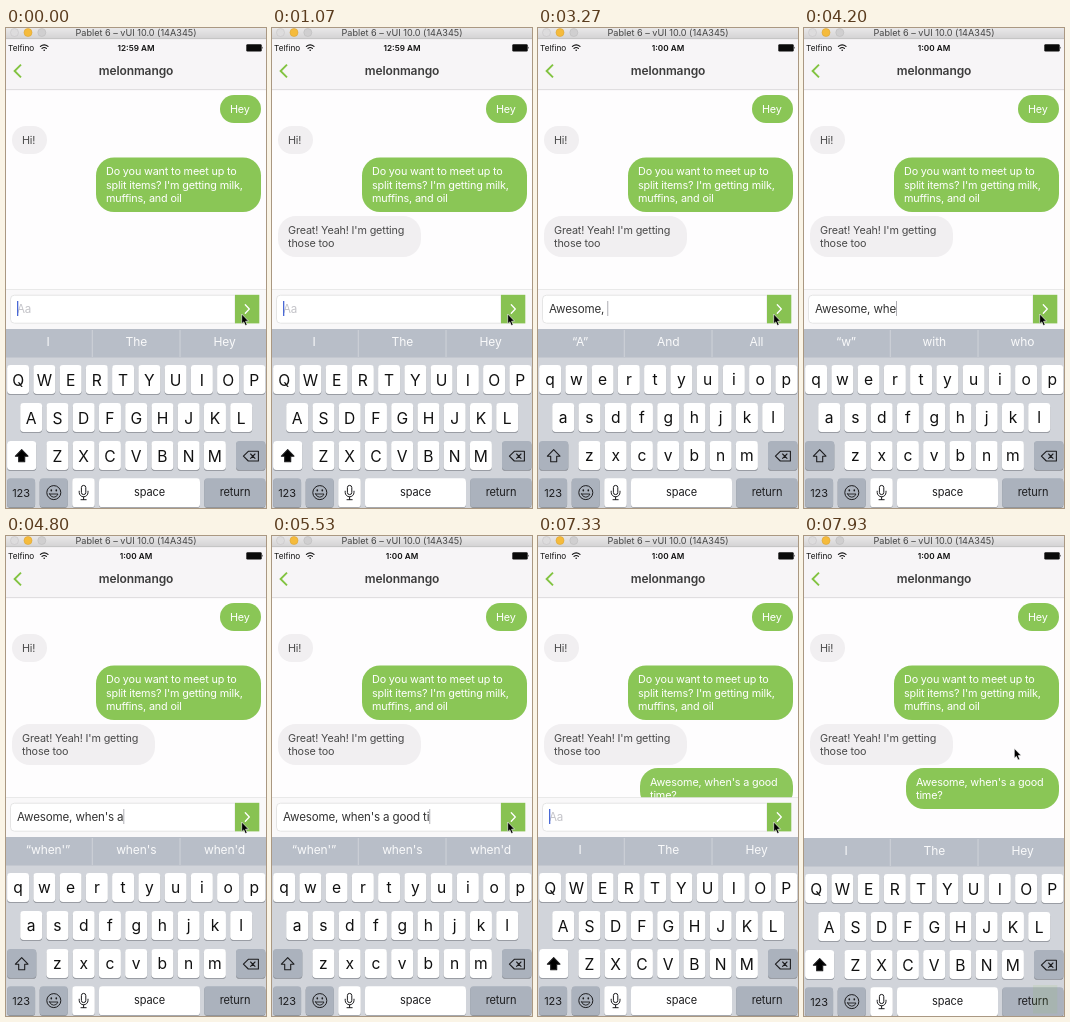
Animation of 260 by 480 pixels, one loop 8 s. Source, as an HTML page:

```html
<!DOCTYPE html>
<html lang="en">
<head>
<meta charset="utf-8">
<title>Chat</title>
<style>
html, body { margin: 0; width: 100%; height: 100%; overflow: hidden; background: #fff; }
svg { display: block; font-family: Inter, Roboto, sans-serif; }
text { white-space: pre; }
.msg { font-size: 10.8px; letter-spacing: -.15px; }
.typed { font-size: 11.6px; letter-spacing: -.16px; }
.key { font-size: 15.6px; text-anchor: middle; fill: #111; }
.small { font-size: 11px; letter-spacing: -.1px; text-anchor: middle; fill: #1c1c1e; }
.hint { font-size: 12px; text-anchor: middle; fill: #fff; opacity: .92; letter-spacing: -.1px; }
.mid { text-anchor: middle; }
.line { fill: none; stroke-linecap: round; stroke-linejoin: round; }
</style>
</head>
<body>
<svg id="stage" width="260" height="480" viewBox="0 0 260 480">
  <defs>
    <linearGradient id="chrome" x2="0" y2="1">
      <stop stop-color="#e9e8e9"/><stop offset="1" stop-color="#d3d2d3"/>
    </linearGradient>
  </defs>
  <rect width="260" height="480" fill="#fefdfe"/>
  <rect y="11" width="260" height="51" fill="#f7f5f7"/>
  <rect y="61.4" width="260" height=".7" fill="#d2d0d2"/>
  <rect width="260" height="11" fill="url(#chrome)"/>
  <rect y="10.5" width="260" height=".6" fill="#b8b8b8"/>
  <circle cx="8.5" cy="4.5" r="4" fill="#dddcdd" stroke="#c6c5c6" stroke-width=".6"/>
  <circle cx="22" cy="4.5" r="4" fill="#f5bb3c" stroke="#dca433" stroke-width=".6"/>
  <circle cx="35.8" cy="4.5" r="4" fill="#d0cfd0" stroke="#bdbcbd" stroke-width=".6"/>
  <text x="130" y="8.4" class="mid" font-size="9.1" fill="#444">Pablet 6 – vUI 10.0 (14A345)</text>

  <text x="2" y="22.8" font-size="8.2" fill="#111">Telfino</text>
  <g class="line" stroke="#111" stroke-width="1.2">
    <path d="M34.4 18.4Q38.2 15.2 42 18.4M36 20.4Q38.2 18.6 40.4 20.4"/>
    <path d="M38.2 22.2v.1" stroke-width="1.6"/>
  </g>
  <text id="clock" x="130" y="22.8" class="mid" font-size="8.2" font-weight="600" fill="#111"></text>
  <rect x="240.3" y="16.2" width="15.4" height="7.2" rx="1.2" fill="#0a0a0a"/>
  <path d="M256.2 18.5q1.3 1.3 0 2.6z"/>

  <path fill="none" d="M15 36.6L8.6 43l6.4 6.4" stroke="#82c341" stroke-width="1.9"/>
  <text x="130" y="47" class="mid" font-size="12" font-weight="600" letter-spacing="-.1" fill="#3c3c3c">melonmango</text>

  <g id="chat"></g>

  <g id="bar">
    <rect y="261.5" width="260" height="40" fill="#f9f8f9"/>
    <rect y="261.3" width="260" height=".6" fill="#dedede"/>
    <path d="M229 267.2H8.5a4 4 0 0 0-4 4v20a4 4 0 0 0 4 4H229z" fill="#fff" stroke="#dcdcdc" stroke-width=".7"/>
    <rect x="229" y="266.8" width="24.3" height="28.6" fill="#88c252"/>
    <path class="line" d="M239.3 276.8l4 4.2-4 4.2" stroke="#fff" stroke-width="1.3"/>
    <text id="empty" x="11" y="284.6" class="typed" fill="#c4c4c9">Aa</text>
    <text id="typed" x="11" y="284.6" class="typed" fill="#333"></text>
    <rect id="caret" y="273" height="15"/>
  </g>

  <g id="board">
    <rect y="301" width="260" height="180" fill="#d1d4da"/>
    <rect y="301" width="260" height="28.5" fill="#b8bec8"/>
    <path d="M86.3 302v27M174 302v27" stroke="#cfd3d9" stroke-width="1"/>
    <g id="hints"></g>
    <g id="keys"></g>
  </g>
  <rect id="glow" x="229" y="449" width="24.3" height="28.6" fill="#88c252"/>
  <path id="mouse" d="M0 0V9.8L2.1 7.9 3.7 11.6 5.4 10.8 3.9 7.2H6.9z" fill="#000" stroke="#fff" stroke-width=".6"/>
</svg>
<script>
const LOOP = 8000;
const $ = id => document.getElementById(id);

function add(parent, tag, attrs, text) {
  const el = document.createElementNS('http://www.w3.org/2000/svg', tag);
  for (const k in attrs) el.setAttribute(k, attrs[k]);
  if (text !== undefined) el.textContent = text;
  parent.appendChild(el);
  return el;
}

function bubble(x, y, w, h, mine, lines) {
  const g = add($('chat'), 'g', {});
  add(g, 'rect', { x, y, width: w, height: h, rx: Math.min(h / 2, 18), fill: mine ? '#8ac656' : '#f1eff1' });
  lines.forEach((s, i) => add(g, 'text', {
    x: x + 10, y: y + 18 + i * 13.4, class: 'msg', fill: mine ? '#fff' : '#4a4a4a'
  }, s));
  return g;
}

bubble(214, 67, 41, 28, true, ['Hey']);
bubble(6, 98, 35, 28, false, ['Hi!']);
bubble(90, 129.4, 165, 54.6, true, ['Do you want to meet up to', "split items? I'm getting milk,", 'muffins, and oil']);
const reply = bubble(6, 188, 143, 41, false, ["Great! Yeah! I'm getting", 'those too']);
const sent = bubble(102, 232, 153, 41, true, ["Awesome, when's a good", 'time?']);

function cap(x, y, w, fill) {
  add($('keys'), 'rect', { x, y: y + .8, width: w, height: 29, rx: 3.4, fill: '#878b92' });
  return add($('keys'), 'rect', { x, y, width: w, height: 29, rx: 3.4, fill });
}

const GRAY = '#abb2bd', WHITE = '#fff';
const upper = [], lower = [];
[['QWERTYUIOP', 12.1, 337], ['ASDFGHJKL', 25.2, 375], ['ZXCVBNM', 51.4, 413]].forEach(([row, x0, y]) => {
  [...row].forEach((c, i) => {
    const x = x0 + i * 26.25;
    cap(x - 11, y, 22, WHITE);
    upper.push(add($('keys'), 'text', { x, y: y + 20.6, class: 'key' }, c));
    lower.push(add($('keys'), 'text', { x, y: y + 19.6, class: 'key' }, c.toLowerCase()));
  });
});

function icon(d, attrs) {
  return add($('keys'), 'path', Object.assign({ d, class: 'line', stroke: '#1c1c1e', 'stroke-width': 1.1 }, attrs));
}

cap(1.1, 413, 29.2, GRAY);
upper.push(add($('keys'), 'rect', { x: 1.1, y: 413, width: 29.2, height: 29, rx: 3.4, fill: WHITE }));
const arrow = 'M15.7 421.6L22 428.2H18.7V433.8H12.7V428.2H9.4z';
lower.push(icon(arrow));
upper.push(icon(arrow, { style: 'fill:#000' }));

cap(230, 413, 29.4, GRAY);
icon('M242.3 423.3H252.4V433H242.3L237.4 428.2zM244.6 426l4.4 4.4M249 426l-4.4 4.4');

cap(1.1, 450.3, 28, GRAY);
add($('keys'), 'text', { x: 15, y: 468.6, class: 'small' }, '123');
cap(33.7, 450.3, 28, GRAY);
add($('keys'), 'circle', { cx: 47.8, cy: 464.6, r: 7, fill: 'none', stroke: '#1c1c1e', 'stroke-width': 1 });
icon('M45.3 462v.8M50.3 462v.8', { 'stroke-width': 1.6 });
icon('M43.6 466H52Q50.8 469.2 47.8 469.2T43.6 466z', { 'stroke-width': .9 });
cap(66.2, 450.3, 22.6, WHITE);
add($('keys'), 'rect', { x: 75.4, y: 457.4, width: 4.4, height: 9.2, rx: 2.2, fill: 'none', stroke: '#1c1c1e' });
icon('M73.2 463.2v1.2a4.4 4.4 0 0 0 8.8 0v-1.2M77.6 469v2.6M75 471.7h5.2', { 'stroke-width': 1 });
cap(93, 450.3, 101, WHITE);
add($('keys'), 'text', { x: 143.5, y: 468.3, class: 'small' }, 'space');
cap(198.2, 450.3, 61.2, GRAY);
add($('keys'), 'text', { x: 229, y: 468.3, class: 'small' }, 'return');

const hints = [42, 130.3, 218.5].map(x => add($('hints'), 'text', { x, y: 318.4, class: 'hint' }));

// Time at which each character of the message is typed
const LINE = "Awesome, when's a good time?";
const STROKES = [2130, 2330, 2470, 2600, 2730, 2930, 3000, 3130, 3270, 3530, 3800, 4130, 4330, 4470,
  4600, 4730, 4800, 4930, 5070, 5130, 5270, 5330, 5400, 5470, 5530, 5670, 5730, 6000];
const SEND = 6930;
const HINTS = [
  [0, 'I', 'The', 'Hey'],
  [2400, '“A”', 'And', 'All'],
  [3600, '“w”', 'with', 'who'],
  [4660, '“when\'”', "when's", "when'd"],
  [6130, 'I', 'The', 'Hey']
];

const ramp = (t, a, b) => Math.min(1, Math.max(0, (t - a) / (b - a)));
const ease = u => u * u * (3 - 2 * u);
const fade = (el, v) => el.setAttribute('opacity', v);

function caretAlpha(t, n) {
  if (t < 2130) return 1 - ramp(t, 60, 200) + ramp(t, 700, 800) - ramp(t, 1070, 1330) + ramp(t, 1720, 1870);
  if (n === LINE.length) return 1 - ramp(t, 6300, 6400) + .4 * ramp(t, 6750, 6800);
  return 1;
}

function draw(t) {
  const n = t < SEND ? STROKES.filter(s => s <= t).length : 0;
  const typing = n > 1;
  $('clock').textContent = t < 1200 ? '12:59 AM' : '1:00 AM';
  $('typed').textContent = LINE.slice(0, n);
  fade($('empty'), n ? 0 : 1);
  const end = n ? $('typed').getComputedTextLength() : 0;
  $('caret').setAttribute('x', 11 + end);
  $('caret').setAttribute('width', typing ? .8 : 1.3);
  $('caret').setAttribute('fill', typing ? '#9a9aa2' : '#4a69d6');
  fade($('caret'), caretAlpha(t, n));

  fade(reply, ramp(t, 60, 400));
  fade(sent, ramp(t, 7060, 7340));

  const low = ramp(t, 2095, 2138) - ramp(t, SEND + 40, SEND + 140);
  lower.forEach(el => fade(el, low));
  upper.forEach(el => fade(el, 1 - low));

  const set = HINTS.filter(h => h[0] <= t).pop();
  hints.forEach((el, i) => { el.textContent = set[i + 1]; });
  fade($('hints'), set[0] ? .3 + .7 * ramp(t, set[0], set[0] + 130) : 1);

  const slide = ramp(t, 7890, 7930);
  $('board').setAttribute('transform', `translate(0 ${slide})`);
  fade($('glow'), .12 * slide);
  fade($('bar'), t < 7925 ? 1 : 0);

  const m = ease(ramp(t, 7330, 7860));
  $('mouse').setAttribute('transform', `translate(${235.7 - 25.4 * m} ${286 - 73.6 * m})`);
}

function tick() {
  draw(performance.now() % LOOP);
  requestAnimationFrame(tick);
}
draw(0);
tick();
</script>
</body>
</html>
```
